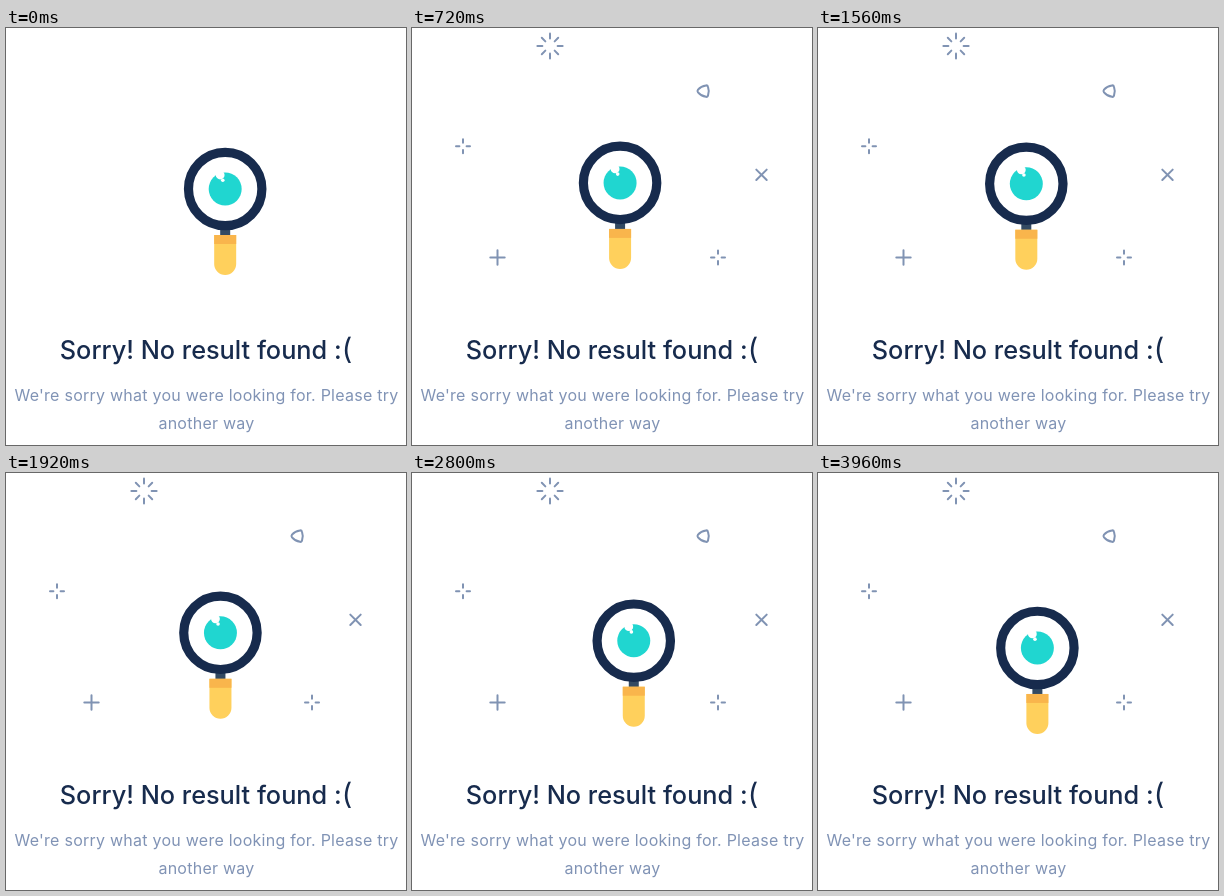
An HTML page that plays this animation: 400x417 px, repeating every 4000 ms.

```html
<!DOCTYPE html>
<html lang="en">
<head>
<meta charset="utf-8">
<title>No result found</title>
<style>
  html, body { margin: 0; width: 100%; height: 100%; overflow: hidden; background: #fff; }
  svg { display: block; width: 100%; height: 100%; }
  text { font-family: Inter, "Open Sans", sans-serif; text-anchor: middle; }
  .title { font-size: 25.3px; font-weight: 500; fill: #172b4d; }
  .paren { font-size: 29px; font-weight: 400; }
  .note { font-size: 16px; letter-spacing: .25px; fill: #8093b5; }
  #sparks { fill: none; stroke: #8093b3; stroke-width: 2; stroke-linecap: round; stroke-linejoin: round; }
</style>
</head>
<body>
<svg viewBox="0 0 400 417">
  <defs>
    <path id="gapPlus" d="M0-7V-3.6M0 3.6V7M-7 0H-3.6M3.6 0H7"/>
  </defs>
  <g id="sparks">
    <g id="burst" transform="translate(138 18)"/>
    <path d="M286 61.6Q289 58 294 57.4Q295.6 57.2 296 58.8Q297.6 63 296 67.6Q295.6 69.2 294 68.8Q289 68 286 64.4Q285 63 286 61.6Z"/>
    <use href="#gapPlus" x="51" y="118.3"/>
    <use href="#gapPlus" x="306" y="229.4"/>
    <path d="M78.3 229.5H92.7M85.5 222.3V236.7"/>
    <path d="M344.3 141.6L354.7 152M354.7 141.6L344.3 152"/>
  </g>
  <g id="glass">
    <rect x="-5" y="39" width="10" height="8" fill="#334a63"/>
    <path d="M-11 46H11V75A11 11 0 0 1-11 75Z" fill="#ffd05c"/>
    <path d="M-11 46H11V55H-11Z" fill="#f9b54c"/>
    <circle r="36.7" fill="#fff" stroke="#172b4d" stroke-width="9.2"/>
    <circle r="16.5" fill="#20d6d0"/>
    <circle cx="-5" cy="-14" r="4.4" fill="#fff"/>
    <circle cx="-2.4" cy="-8.8" r="1.8" fill="#fff"/>
  </g>
  <text class="title" x="200" y="331">Sorry! No result found :<tspan class="paren">(</tspan></text>
  <text class="note" x="200.5" y="372.5">We're sorry what you were looking for. Please try</text>
  <text class="note" x="200.5" y="400.5">another way</text>
</svg>
<script>
const LOOP = 4000, FADE = 600;
// time, x, y of the lens centre
const stops = [[0, 219.2, 161], [1155, 201.4, 151.2], [2400, 222.6, 165.2], [4000, 219.3, 175.2]];
const byId = id => document.getElementById(id);
const glass = byId("glass"), sparks = byId("sparks");

let rays = "";
for (let i = 0; i < 8; i++) {
  const near = i % 2 ? 6.6 : 7.6;
  rays += `<path d="M${near} 0H${near + 5}" transform="rotate(${i * 45})"/>`;
}
byId("burst").innerHTML = rays;

function lensAt(t) {
  const i = stops.findIndex(s => s[0] > t);
  const a = stops[i - 1], b = stops[i];
  const k = (t - a[0]) / (b[0] - a[0]);
  return [1, 2].map(n => a[n] + (b[n] - a[n]) * k);
}

function draw(t) {
  const [x, y] = lensAt(t);
  glass.setAttribute("transform", `translate(${x} ${y})`);
  sparks.setAttribute("opacity", Math.min(1, t / FADE));
}

const start = performance.now();
function tick(now) {
  draw(Math.max(0, now - start) % LOOP);
  requestAnimationFrame(tick);
}
draw(0);
requestAnimationFrame(tick);
</script>
</body>
</html>
```
